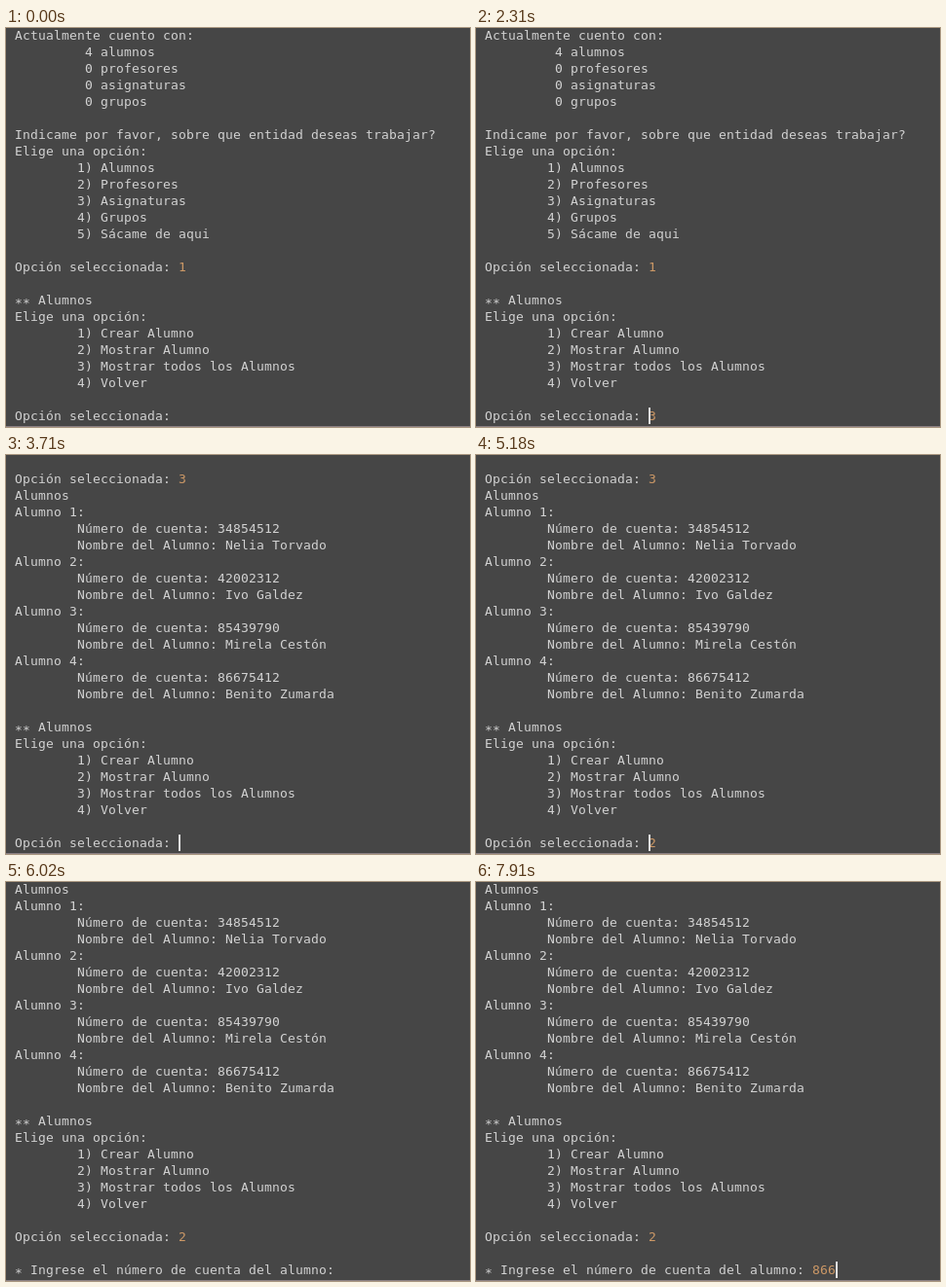
An HTML page with a canvas for the animation above (8 s loop, 476 by 410 pixels).

```html
<!DOCTYPE html>
<html lang="es">
<head>
<meta charset="utf-8">
<title>Consola</title>
<style>
  html, body { margin: 0; width: 100%; height: 100%; overflow: hidden; background: #464646; }
  canvas { display: block; width: 476px; height: 410px; }
</style>
</head>
<body>
<canvas id="stage"></canvas>
<script>
const WIDTH = 476, HEIGHT = 410, LOOP = 8000;
const LEFT = 9, CELL = 8, ROW = 17, BASELINE = 12, LAST_ROW = 23;
const BACK = '#464646', INK = '#d2d2d2', INPUT = '#cc9866', CARET = '#e0e0e0', EDGE = '#8b8083';

const tab = ' '.repeat(8);
const OPTION = 'Opción seleccionada: ';
const ACCOUNT = '* Ingrese el número de cuenta del alumno: ';

const choices = (...items) =>
  ['Elige una opción:', ...items.map((item, i) => `${tab}${i + 1}) ${item}`), ''];
const studentMenu = ['** Alumnos',
  ...choices('Crear Alumno', 'Mostrar Alumno', 'Mostrar todos los Alumnos', 'Volver')];
const student = ([account, name], i) => [
  `Alumno ${i + 1}:`,
  `${tab}Número de cuenta: ${account}`,
  `${tab}Nombre del Alumno: ${name}`];

// "|" separates a prompt from the typed answer.
const log = [
  'Actualmente cuento con:',
  ...['4 alumnos', '0 profesores', '0 asignaturas', '0 grupos'].map(s => `${tab} ${s}`),
  '',
  'Indicame por favor, sobre que entidad deseas trabajar?',
  ...choices('Alumnos', 'Profesores', 'Asignaturas', 'Grupos', 'Sácame de aqui'),
  `${OPTION}|1`,
  '',
  ...studentMenu,
  `${OPTION}|3`,
  'Alumnos',
  ...[['34854512', 'Nelia Torvado'], ['42002312', 'Ivo Galdez'],
      ['85439790', 'Mirela Cestón'], ['86675412', 'Benito Zumarda']].flatMap(student),
  '',
  ...studentMenu,
  `${OPTION}|2`,
  ''
];

// Start time, first visible log line, prompt, typed answer, caret column (-1 = hidden).
const steps = [
  [0, 0, OPTION, '', -1],
  [210, 0, OPTION, '', 21],
  [700, 0, OPTION, '', -1],
  [1260, 0, OPTION, '', 21],
  [1680, 0, OPTION, '3', 22],
  [2170, 0, OPTION, '3', -1],
  [2310, 0, OPTION, '3', 21],
  [2380, 22, '', '', 0],
  [2450, 22, OPTION, '', -1],
  [2660, 22, OPTION, '', 21],
  [3150, 22, OPTION, '', -1],
  [3710, 22, OPTION, '', 21],
  [4200, 22, OPTION, '', -1],
  [4410, 22, OPTION, '2', 22],
  [4900, 22, OPTION, '2', -1],
  [5040, 22, OPTION, '2', 21],
  [5250, 24, '', '', 0],
  [5320, 24, ACCOUNT, '', -1],
  [5530, 24, ACCOUNT, '', 42],
  [6020, 24, ACCOUNT, '', -1],
  [6580, 24, ACCOUNT, '', 42],
  [6720, 24, ACCOUNT, '8', 43],
  [7280, 24, ACCOUNT, '8', -1],
  [7350, 24, ACCOUNT, '86', 44],
  [7630, 24, ACCOUNT, '866', 45]
];

const canvas = document.getElementById('stage');
const ctx = canvas.getContext('2d', { alpha: false });
const ratio = window.devicePixelRatio || 1;
canvas.width = WIDTH * ratio;
canvas.height = HEIGHT * ratio;
ctx.scale(ratio, ratio);
ctx.font = '13px "DejaVu Sans Mono", monospace';

function fill(color, x, y, w, h) {
  ctx.fillStyle = color;
  ctx.fillRect(x, y, w, h);
}

function drawText(text, column, row, color) {
  ctx.fillStyle = color;
  [...text].forEach((char, i) => {
    const drop = char === '*' ? 3 : 0; // asterisks sit at mid height
    ctx.fillText(char, LEFT + (column + i) * CELL, BASELINE + row * ROW + drop);
  });
}

function drawLine(line, row) {
  const [text, answer = ''] = line.split('|');
  drawText(text, 0, row, INK);
  drawText(answer, text.length, row, INPUT);
}

function draw([, top, prompt, typed, caret]) {
  fill(BACK, 0, 0, WIDTH, HEIGHT);
  fill(EDGE, 0, HEIGHT - 1, WIDTH, 1);
  for (let row = 0; row < LAST_ROW; row++) drawLine(log[top + row], row);
  drawLine(`${prompt}|${typed}`, LAST_ROW);
  if (caret >= 0) fill(CARET, LEFT + caret * CELL, 390, 2, 17);
}

const start = performance.now();
let shown;
function tick() {
  const time = (performance.now() - start) % LOOP;
  const step = steps.findLast(([from]) => from <= time);
  if (step !== shown) draw(shown = step);
  requestAnimationFrame(tick);
}
tick();
</script>
</body>
</html>
```
